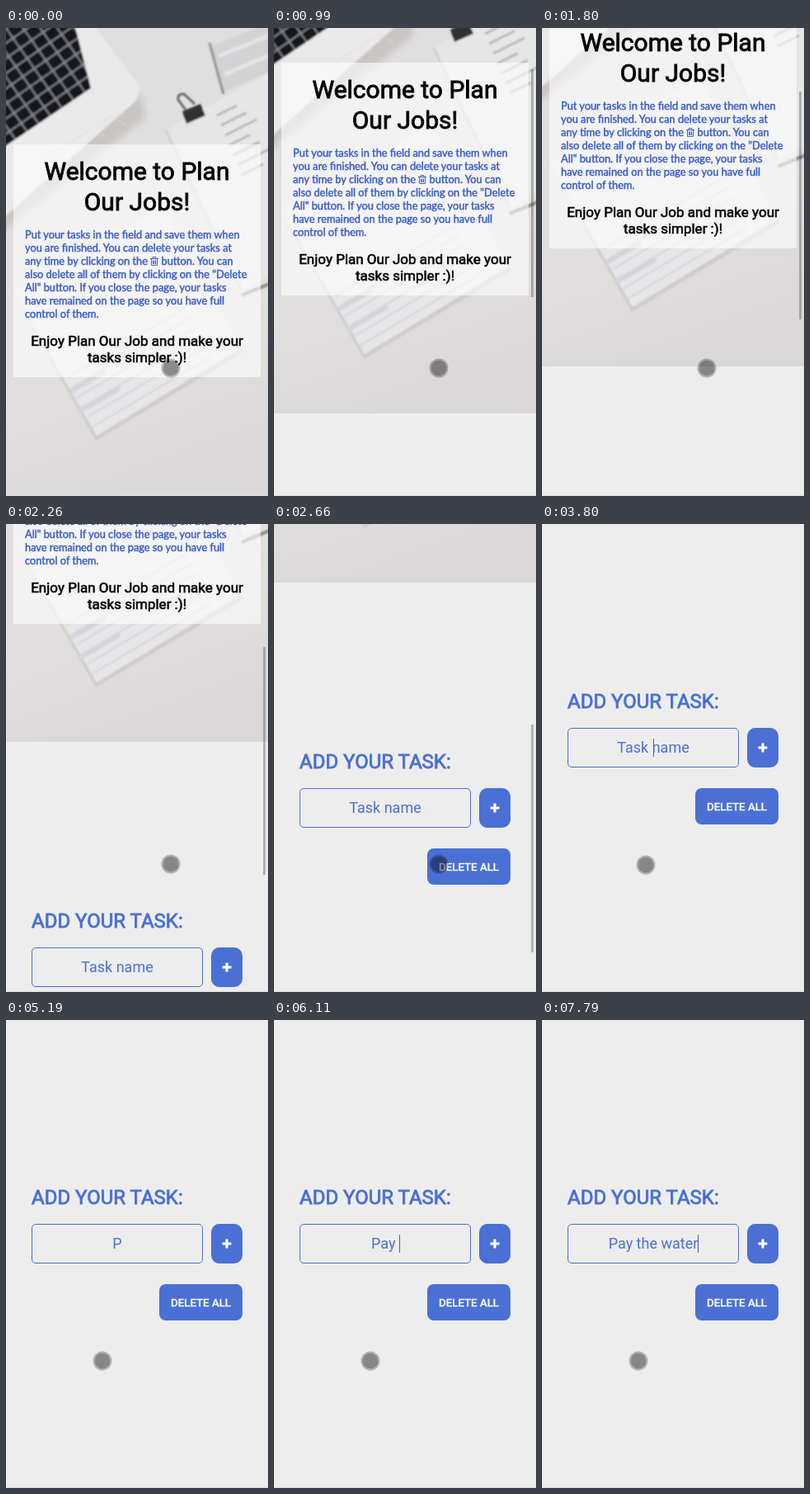
Animation of 318x567 px, one loop 7.99 s. Source, as an HTML page:

```html
<!DOCTYPE html>
<html lang="en">
<head>
<meta charset="utf-8">
<title>Task list</title>
<style>
  html, body { margin: 0; width: 100%; height: 100%; overflow: hidden; background: #ededed; }
  #stage { position: relative; width: 318px; height: 567px; overflow: hidden; background: #ededed; }
  #page { position: absolute; left: 0; top: 0; width: 318px; height: 1135px; will-change: transform; }
  #page > svg { position: absolute; left: 0; top: 0; }
  text { font-family: Roboto, sans-serif; fill: currentColor; stroke: currentColor; }
  .black { color: #050505; }
  .blue { color: #4a6fd3; }
  .white { color: #fff; }
  #intro {
    position: absolute; left: 23px; top: 242px; margin: 0; white-space: pre;
    font: 12.8px/16px Lato, sans-serif; color: #3a5ccd; -webkit-text-stroke: .45px;
  }
  #intro svg { width: 10px; height: 11px; vertical-align: -1px; }
  #field {
    position: absolute; left: 31px; top: 815px; width: 208px; height: 48px; box-sizing: border-box;
    border: 1px solid #4a6fd3; border-radius: 5px; color: #4a6fd3;
    font: 18px/22px Roboto, sans-serif;
  }
  #field div { position: absolute; inset: 0; display: flex; justify-content: center; align-items: center; }
  #field span { position: relative; height: 22px; white-space: pre; }
  #typed { font-weight: 400; }
  #caret { position: absolute; left: 100%; top: 0; width: 1px; height: 22px; background: #4460b0; }
  #bar { position: absolute; left: 312px; top: 0; width: 3px; height: 276px; background: rgba(0, 0, 0, .25); }
  #touch {
    position: absolute; left: -11.5px; top: -11.5px; width: 23px; height: 23px; box-sizing: border-box;
    border: 2px solid rgba(0, 0, 0, .25); border-radius: 50%;
    background: rgba(0, 0, 0, .43); background-clip: padding-box;
  }
  #edge { position: absolute; left: 0; top: 566px; width: 318px; height: 1px; background: #dedede; }
</style>
</head>
<body>
<div id="stage">
  <div id="page">
    <svg width="318" height="1135">
      <defs>
        <linearGradient id="desk" x1=".2" y1="0" x2=".4" y2="1">
          <stop offset="0" stop-color="#dfdede"/>
          <stop offset=".7" stop-color="#e2e0df"/>
          <stop offset="1" stop-color="#dad8d8"/>
        </linearGradient>
        <pattern id="keys" width="17" height="15" patternUnits="userSpaceOnUse" patternTransform="rotate(-35)">
          <rect width="17" height="15" fill="#80858b"/>
          <rect x="1" y="1" width="15" height="13" rx="2" fill="#12171d"/>
        </pattern>
        <filter id="wide"><feGaussianBlur stdDeviation="4"/></filter>
        <filter id="soft"><feGaussianBlur stdDeviation="1.3"/></filter>
        <clipPath id="photo"><path d="M0 0H318V566H0Z"/></clipPath>
      </defs>

      <g clip-path="url(#photo)">
        <path fill="url(#desk)" d="M0 0H318V566H0Z"/>
        <path filter="url(#wide)" fill="#c9c5c2" d="M-9 150L164 80L170 108L-9 250Z"/>
        <g filter="url(#soft)">
          <path fill="#e9e9ea" d="M-5 -5H105L163 72L158 88L-5 232Z"/>
          <path fill="url(#keys)" d="M-5 -5H83L103 73L-5 146Z"/>
          <path fill="none" stroke="#dcdcdd" d="M58 152L128 106L146 118"/>

          <path fill="#e6e6e7" d="M196 122L330 48V292L288 318Z"/>
          <path fill="none" stroke="#cfcdcc" stroke-width="2" d="M194 124L286 318"/>
          <path fill="#d3d3d5" d="M250 22L322 -8V52L264 78Z"/>
          <path fill="none" stroke="#e4e4e5" stroke-width="5" d="M258 34L322 8M266 56L322 32"/>
          <path fill="none" stroke="#8e9094" stroke-width="3" d="M247 18L264 80"/>
          <g id="notes" fill="none" stroke="#a9aaad" stroke-width="2.5"></g>
          <path fill="#2e3135" d="M214 101L236 92L242 106L219 116Z"/>
          <path fill="none" stroke="#55585c" stroke-width="2.5" d="M218 99L209 87Q208 79 216 80L229 92"/>

          <path fill="#cfccca" d="M6 318L109 500L288 393L285 386L110 493Z"/>
          <path fill="#e6e6e8" d="M10 320L190 215L285 388L110 494Z"/>
          <g id="rules" fill="none" stroke="#d3d3d7" stroke-width="1.5"></g>
          <path fill="none" stroke="#d5d5da" stroke-width="6" d="M90 464L138 436M78 440L120 416"/>
          <path fill="none" stroke="#938985" stroke-width="4" d="M286 324L322 309"/>
        </g>
      </g>

      <path fill="#fff" fill-opacity=".6" d="M9 141H309V423H9Z"/>
      <g class="black" text-anchor="middle">
        <g font-size="30" stroke-width=".9">
          <text x="159" y="184">Welcome to Plan</text>
          <text x="159" y="221">Our Jobs!</text>
        </g>
        <g font-size="17" stroke-width=".6">
          <text x="159" y="385">Enjoy Plan Our Job and make your</text>
          <text x="159" y="405">tasks simpler :)!</text>
        </g>
      </g>

      <text class="blue" x="31" y="791" font-size="24" stroke-width=".85">ADD YOUR TASK:</text>
      <g fill="#4a70d6">
        <rect x="249" y="815" width="38" height="48" rx="10"/>
        <rect x="186" y="888" width="101" height="44" rx="8"/>
      </g>
      <path stroke="#fff" stroke-width="3.2" d="M262.5 839H273.5M268 833.5V844.5"/>
      <text class="white" x="236.5" y="915" font-size="13.333" stroke-width=".55" text-anchor="middle">DELETE ALL</text>
    </svg>

    <p id="intro">Put your tasks in the field and save them when
you are finished. You can delete your tasks at
any time by clicking on the <svg viewBox="0 0 10 11" fill="none" stroke="currentColor"><path d="M0 2.5H10M3 2V.6H7V2M1.5 3V10.4H8.5V3M3.5 4.5V9M5 4.5V9M6.5 4.5V9"/></svg> button. You can
also delete all of them by clicking on the "Delete
All" button. If you close the page, your tasks
have remained on the page so you have full
control of them.</p>

    <div id="field">
      <div><span id="hint">Task name</span></div>
      <div><span><b id="typed"></b><i id="caret"></i></span></div>
    </div>
  </div>
  <div id="bar"></div>
  <div id="touch"></div>
  <div id="edge"></div>
</div>

<script>
  const LOOP = 7990, FRAME = 66.6;
  const MAX_SCROLL = 568, NOTCH = 100, GLIDE = 190;
  const FOCUS = 3655, BLINK = 520;

  const el = id => document.getElementById(id);
  const clamp = v => Math.min(1, Math.max(0, v));
  const smooth = v => (v = clamp(v), v * v * (3 - 2 * v));

  // Each wheel notch glides the page by 100px.
  const wheels = [820, 1695, 2095, 2237, 2500, 2885, 3050];
  const moves = [
    { from: 3120, to: 3450, x: 134, y: 275 },
    { from: 3600, to: 3790, x: 125.5, y: 412.5 },
    { from: 3930, to: 3990, x: 116.5, y: 412.5 }
  ];
  const bursts = [
    { start: 4655, gap: 0, text: "P" },
    { start: 5245, gap: 170, text: "ay " },
    { start: 6175, gap: 133, text: "the " },
    { start: 7245, gap: 135, text: "water" }
  ];
  const keys = bursts.flatMap(b => [...b.text].map((char, i) => ({ char, time: b.start + i * b.gap })));

  function scrollAt(t) {
    const sum = wheels.reduce((total, w) => total + NOTCH * smooth((t - w) / GLIDE), 0);
    return Math.round(Math.min(MAX_SCROLL, sum));
  }

  function barOpacityAt(t) {
    const last = wheels.findLast(w => w <= t) ?? -Infinity;
    return clamp((650 - (t - last)) / 180);
  }

  function touchAt(t) {
    let x = 199.5, y = 411.5;
    for (const m of moves) {
      const p = smooth((t - m.from) / (m.to - m.from));
      x += (m.x - x) * p;
      y += (m.y - y) * p;
    }
    return [x, y];
  }

  function draw(now) {
    const t = Math.floor((now % LOOP + 10) / FRAME) * FRAME;
    const y = scrollAt(t);
    const [tx, ty] = touchAt(t);
    const pressed = keys.filter(k => k.time <= t);
    const lastInput = pressed.at(-1)?.time ?? FOCUS;
    const caretOn = t >= FOCUS && Math.floor((t - lastInput) / BLINK) % 2 === 0;

    el("page").style.transform = `translateY(${-y}px)`;
    el("bar").style.transform = `translateY(${Math.round(1.5 + y * .487)}px)`;
    el("bar").style.opacity = barOpacityAt(t);
    el("touch").style.transform = `translate(${tx}px, ${ty}px)`;
    el("caret").style.opacity = +caretOn;
    el("hint").style.visibility = pressed.length ? "hidden" : "visible";
    el("typed").textContent = pressed.map(k => k.char).join("");
  }

  function addLines(id, count, shape) {
    el(id).innerHTML = Array.from({ length: count }, (_, i) => `<path d="${shape(i)}"/>`).join("");
  }
  addLines("notes", 7, i => `M${256 + i * 5} ${106 + i * 12}l${24 + i * 7 % 20} ${-12 - i * 3.5 % 10}`);
  addLines("rules", 6, i => `M${74 + i * 6} ${424 + i * 12}l145 -86`);

  const start = performance.now();
  function tick() {
    draw(performance.now() - start);
    requestAnimationFrame(tick);
  }
  tick();
</script>
</body>
</html>
```
